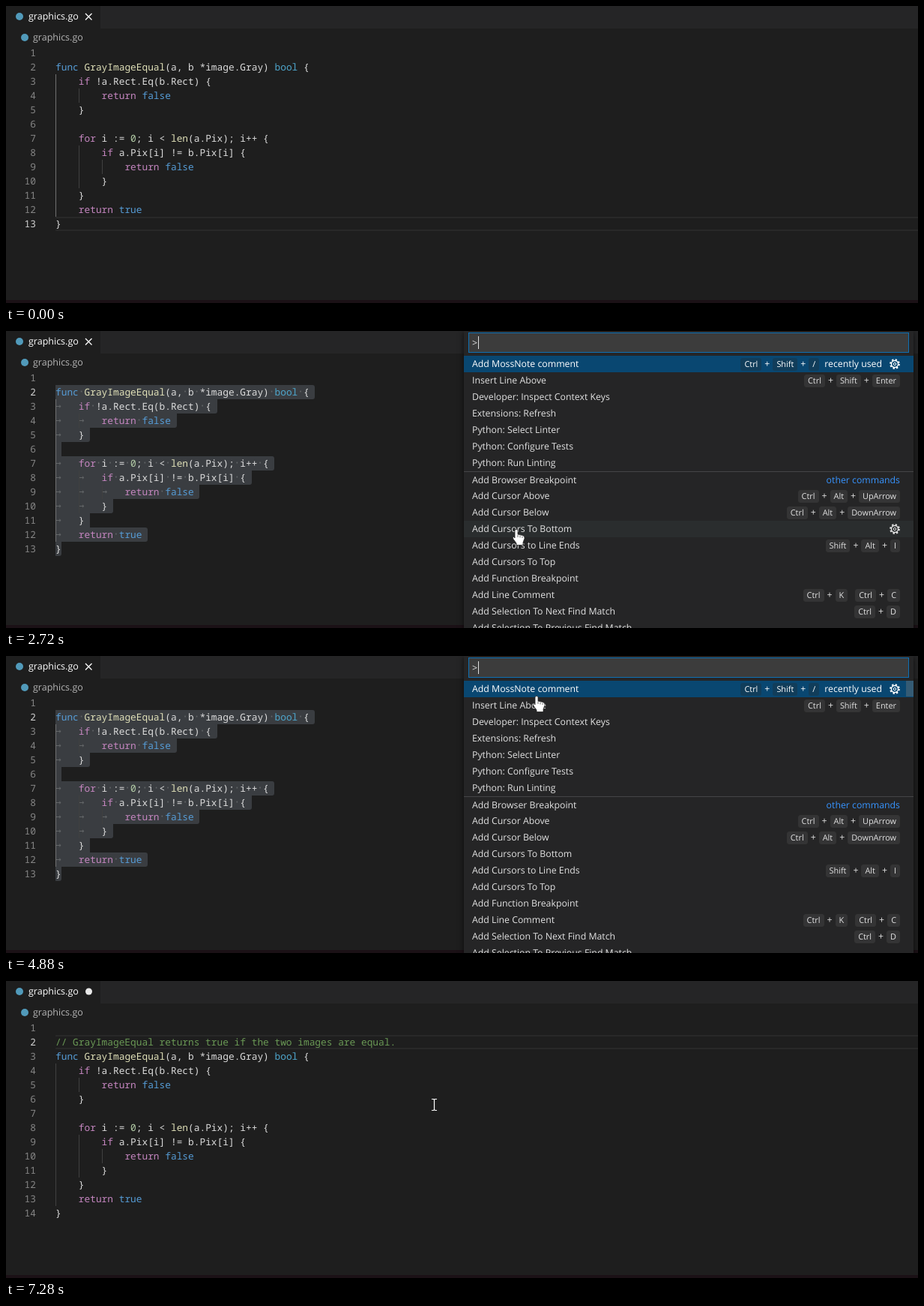
Recreate the animation shown at these times as an HTML page. Size 1217 by 396 pixels, loop 8000 ms.

```html
<!DOCTYPE html>
<html lang="en">
<head>
<meta charset="utf-8">
<title>Code editor</title>
<style>
html, body { margin: 0; width: 100%; height: 100%; overflow: hidden; background: #1e1e1e; }
body { position: relative; font: 12.3px/22px "Open Sans", "Noto Sans", sans-serif; color: #e2e2e2; text-rendering: geometricPrecision; }
body *, body svg { box-sizing: border-box; }
.abs, .abs > div { position: absolute; white-space: pre; }
#bar { left: 126px; top: 0; right: 0; height: 30px; background: #252526; }
#strip { left: 0; top: 392px; width: 100%; height: 4px; background: #1b1116; }
#tab, #crumb { font-size: 12.5px; }
#tab { left: 30px; top: 3px; color: #fff; }
#crumb { left: 36px; top: 31px; color: #b4b4b4; }
#nums, #code, #note { font: 12.83px/19px "Noto Sans Mono", "DejaVu Sans Mono", monospace; }
#nums { left: 0; top: 53px; width: 40px; color: #858585; }
#nums > div { right: 0; }
#nums .on { color: #d0d0d0; }
#code { left: 66px; top: 72px; color: #dcdcdc; }
#note { left: 66px; top: 72px; color: #6a9955; }
#line { left: 66px; right: 0; height: 19px; border: solid #282828; border-width: 2px 0; }
.sel { height: 19px; background: #264f78; }
.gray .sel { background: #3a3d41; }
.dots { font: 12.79px/19px "DejaVu Sans Mono", monospace; color: rgba(227, 228, 226, .24); }
.guide { width: 1px; background: #404040; }
.guide.on { background: #707070; }
.match { width: 8px; height: 18px; border: 1px solid #888; }
#caret { width: 2px; height: 19px; background: #d8d8d8; }
.k { color: #569cd6 } .t { color: #4ea6cc } .c { color: #c586c0 } .f { color: #e0e0b8 } .n { color: #b5cea8 }
#pal { position: absolute; left: 611px; top: 0; width: 600px; height: 396px; overflow: hidden; background: #252526; }
#shade { position: absolute; left: 611px; top: 0; width: 600px; height: 396px; box-shadow: 0 2px 7px rgba(0, 0, 0, .65); }
#input { position: absolute; left: 6px; top: 2px; width: 588px; height: 27px; border: 1px solid #0e70b4; background: #3c3c3c; padding-left: 4px; line-height: 26px; }
#blink { position: absolute; left: 19px; top: 7px; width: 1px; height: 17px; background: #e0e0e0; }
.row { position: absolute; left: 0; width: 600px; height: 22px; padding: 0 18px 0 11px; display: flex; align-items: center; white-space: pre; }
.row .label { flex: 1; }
.row.hover { background: #2a2d2e; }
.row.first { background: #094771; color: #fff; }
.row.rule { border-top: 1px solid #454547; }
.key { font-size: 10.9px; line-height: 15px; padding: 0 4px; border: 1px solid #343434; border-radius: 3px; background: rgba(128, 128, 128, .17); }
.first .key { border-color: transparent; background: rgba(37, 37, 38, .3); }
.plus { width: 15px; text-align: center; }
.gap { width: 10px; }
.tag { margin-left: 7px; }
.rule .tag { color: #3794ff; }
.gear { display: none; width: 14px; height: 14px; margin-left: 10px; flex: none; }
.hover .gear, .first .gear { display: block; }
#thumb { position: absolute; left: 590px; top: 33px; width: 10px; height: 21px; background: rgba(121, 121, 121, .4); }
#art { position: absolute; left: 0; top: 0; width: 1217px; height: 396px; }
</style>
</head>
<body>
<div class="abs" id="bar"></div>
<div class="abs" id="strip"></div>
<div class="abs" id="tab">graphics.go</div>
<div class="abs" id="crumb">graphics.go</div>
<div class="abs" id="line"></div>
<div class="abs" id="nums"></div>
<div class="abs" id="note">// GrayImageEqual returns true if the two images are equal.</div>
<div class="abs" id="code"></div>
<div class="abs" id="caret"></div>
<div id="shade"></div>
<div id="pal"><div id="input">&gt;</div><div id="blink"></div></div>
<svg id="art" viewBox="0 0 1217 396" fill="none">
  <g fill="#519aba"><circle cx="18" cy="14" r="5"/><circle cx="25" cy="42" r="5"/></g>
  <path id="close" d="M106 10l8.5 8.5M114.5 10l-8.5 8.5" stroke="#fff" stroke-width="1.3"/>
  <circle id="dirty" cx="110.5" cy="14" r="4.5" fill="#e8e8e8"/>
  <path id="folds" stroke="#c5c5c5" stroke-width="1.2"/>
  <circle id="press" r="12" fill="#f0e600" fill-opacity=".53"/>
  <path id="beam" d="M-3.5-7.5H-1L0-6.5 1-7.5H3.5M0-7V7M-3.5 7.5H-1L0 6.5 1 7.5H3.5" stroke="#fff" stroke-width="1.2"/>
  <g id="hand">
    <path d="M-2 1.5Q0-1 2 1.5V7L8.5 8.5Q11.5 9.5 11 12.5L9 18V21.5H0V19L-4 13.5Q-5.5 11 -3.5 10.5L-2 12Z" fill="#fff" stroke="#222" stroke-width=".8"/>
    <path d="M2 7.5V11M5 8.5V11.5M8 9.5V12" stroke="#444" stroke-width=".8"/>
  </g>
</svg>
<script>
const LOOP = 8000, CHAR = 7.697, LH = 19;
const $ = id => document.getElementById(id);
const show = (el, on) => { el.style.visibility = on ? 'visible' : 'hidden'; };

function add(parent, cls, style, html = '') {
  const el = document.createElement('div');
  el.className = cls;
  Object.assign(el.style, style);
  el.innerHTML = html;
  parent.append(el);
  return el;
}

const source = [
  'func GrayImageEqual(a, b *image.Gray) bool {',
  '\tif !a.Rect.Eq(b.Rect) {',
  '\t\treturn false',
  '\t}',
  '',
  '\tfor i := 0; i < len(a.Pix); i++ {',
  '\t\tif a.Pix[i] != b.Pix[i] {',
  '\t\t\treturn false',
  '\t\t}',
  '\t}',
  '\treturn true',
  '}'
];
const tokens = /\b(?:(func|true|false)|(bool)|(if|for|return)|(GrayImageEqual|len)|(0))\b/g;
const paint = s => s.replace('<', '&lt;').replace(tokens, (m, ...g) =>
  `<span class="${'ktcfn'[g.slice(0, 5).findIndex(Boolean)]}">${m}</span>`);
const expand = s => s.replace(/\t/g, '    ');
const blanks = s => s.replace(/[^\s]/g, '\u0001').replace(/ /g, '·').replace(/\t/g, '→   ').replace(/\u0001/g, ' ');
const px = v => v + 'px';

// Code layers: selection, blanks, guides, text
const code = $('code');
const widths = source.map((s, i) => Math.floor((expand(s).length + (i < source.length - 1 ? 1 : 0)) * CHAR + .5));
const corner = (w, other) => other === undefined || other < w ? '3px' : '0';
const picked = source.map((s, i) => [
  add(code, 'sel', { left: 0, top: px(i * LH), width: px(widths[i]),
    borderRadius: `0 ${corner(widths[i], widths[i - 1])} ${corner(widths[i], widths[i + 1])} 0` }),
  add(code, 'dots', { left: 0, top: px(i * LH) }, blanks(s))
]);
const guide = (col, row, n) => add(code, 'guide', { left: px(Math.round(col * 4 * CHAR)), top: px(row * LH), height: px(n * LH) });
const outer = guide(0, 1, 10);
guide(1, 2, 1);
const inner = guide(1, 6, 3);
guide(2, 7, 1);
source.forEach((s, i) => add(code, '', { left: 0, top: px(i * LH) }, paint(expand(s))));
const matches = [[43, 0], [0, 11]].map(([c, r]) => add(code, 'match', { left: px(c * CHAR), top: px(r * LH) }));
const nums = Array.from({ length: 14 }, (_, i) => add($('nums'), '', { top: px(i * LH) }, i + 1));
$('folds').setAttribute('d', [2, 3, 7, 8].map(n => `M50 ${n * LH + 41.5}l5 5 5-5`).join(''));

// Command palette
const gear = '<svg class="gear" viewBox="-7 -7 14 14" fill="none" stroke="currentColor">' +
  '<circle r="5.9" stroke-width="2" stroke-dasharray="2.3 2.33"/><circle r="4.5" stroke-width="1.4"/><circle r="1.7"/></svg>';
const commands = [
  ['Add MossNote comment', 'Ctrl+Shift+/', 'recently used'],
  ['Insert Line Above', 'Ctrl+Shift+Enter'],
  ['Developer: Inspect Context Keys'],
  ['Extensions: Refresh'],
  ['Python: Select Linter'],
  ['Python: Configure Tests'],
  ['Python: Run Linting'],
  ['Add Browser Breakpoint', '', 'other commands'],
  ['Add Cursor Above', 'Ctrl+Alt+UpArrow'],
  ['Add Cursor Below', 'Ctrl+Alt+DownArrow'],
  ['Add Cursors To Bottom'],
  ['Add Cursors to Line Ends', 'Shift+Alt+I'],
  ['Add Cursors To Top'],
  ['Add Function Breakpoint'],
  ['Add Line Comment', 'Ctrl+K Ctrl+C'],
  ['Add Selection To Next Find Match', 'Ctrl+D'],
  ['Add Selection To Previous Find Match']
];
const keys = s => s.split(' ').map(chord => chord.split('+')
  .map(k => `<span class="key">${k}</span>`).join('<span class="plus">+</span>')).join('<span class="gap"></span>');
const rows = commands.map(([label, combo, tag], i) =>
  add($('pal'), 'row' + (i === 0 ? ' first' : i === 7 ? ' rule' : ''), { top: px(33 + i * 22) },
    `<span class="label">${label}</span>${combo ? keys(combo) : ''}${tag ? `<span class="tag">${tag}</span>` : ''}${gear}`));
const thumb = add($('pal'), '', {});
thumb.id = 'thumb';

// Pointer moves: first step, last step, step count, end x, end y, optional bend
const moves = [
  [190, 930, 12, 87.5, 290, [300, 174]],
  [1010, 1010, 1, 85.5, 286],
  [1290, 1350, 2, 71.5, 226],
  [1420, 1770, 6, 44, 81],
  [1840, 1840, 1, 44, 77],
  [2240, 2520, 5, 681, 263],
  [3990, 4530, 9, 708, 52],
  [5210, 5340, 3, 714.5, 46],
  [5680, 5950, 5, 571.5, 165]
];
function pointer(t) {
  let x = 1066, y = 400;
  for (const [t0, t1, n, ex, ey, bend] of moves) {
    if (t < t0) break;
    const step = n > 1 ? Math.floor((t - t0) / (t1 - t0) * (n - 1) + 1e-6) : 0;
    let u = Math.min(1, (step + 1) / n);
    if (n > 3 && t0 !== 1420) u = u * u * (3 - 2 * u);
    const [bx, by] = bend || [(x + ex) / 2, (y + ey) / 2];
    const mix = (a, b, c) => (1 - u) * (1 - u) * a + 2 * u * (1 - u) * b + u * u * c;
    x = mix(x, bx, ex);
    y = mix(y, by, ey);
  }
  return [x, y];
}

const blinks = [3460, 3990, 4460, 4880, 5340];
const within = (t, a, b) => t >= a && t < b;

function render(t) {
  const [x, y] = pointer(t);
  const open = within(t, 2720, 5680);
  const done = t >= 7210;
  const gutter = within(t, 1220, 2240) && x < 62;
  const dragging = within(t, 1290, 1770);
  const selected = within(t, 1290, 7210);
  const start = t < 1290 ? 13 : dragging ? Math.floor((y - 53) / LH) + 2 : 2;

  code.style.top = px(done ? 91 : 72);
  show($('note'), done);
  show(nums[13], done);
  nums.forEach((el, i) => { el.className = i + 1 === start ? 'on' : ''; });
  picked.forEach((parts, i) => parts.forEach(el => show(el, selected && i >= start - 2)));
  code.classList.toggle('gray', t >= 2720);
  outer.classList.toggle('on', t < 1290 || within(t, 1770, 7210));
  inner.classList.toggle('on', within(t, 1290, 1420));
  matches.forEach(el => show(el, within(t, 1220, 1420)));

  show($('line'), !selected);
  $('line').style.top = px(done ? 72 : 281);
  show($('caret'), within(t, 1220, 2720));
  $('caret').style.left = px(t < 1290 ? 74 : 66);
  $('caret').style.top = px(53 + (start - 1) * LH);
  show($('close'), t < 7280);
  show($('dirty'), t >= 7280);
  show($('folds'), gutter);

  $('pal').style.display = $('shade').style.display = open ? 'block' : 'none';
  show($('blink'), blinks.filter(b => t >= b).length % 2 === 0);
  show(thumb, t >= 3060);
  const over = Math.floor((y - 33) / 22);
  rows.forEach((el, i) => el.classList.toggle('hover', open && i === over));

  const hand = open || gutter;
  const place = (id, dx, dy) => $(id).setAttribute('transform', `translate(${x + dx} ${y + dy})`);
  show($('beam'), !hand && t >= 190);
  show($('hand'), hand);
  show($('press'), within(t, 1220, 2100) || within(t, 5610, 5750));
  place('beam', 0, 0);
  place('hand', 0, 1);
  place('press', hand ? 0 : -2.5, hand ? 0 : -2);
}

const begin = performance.now();
function tick() {
  render((performance.now() - begin) % LOOP);
  requestAnimationFrame(tick);
}
tick();
</script>
</body>
</html>
```
